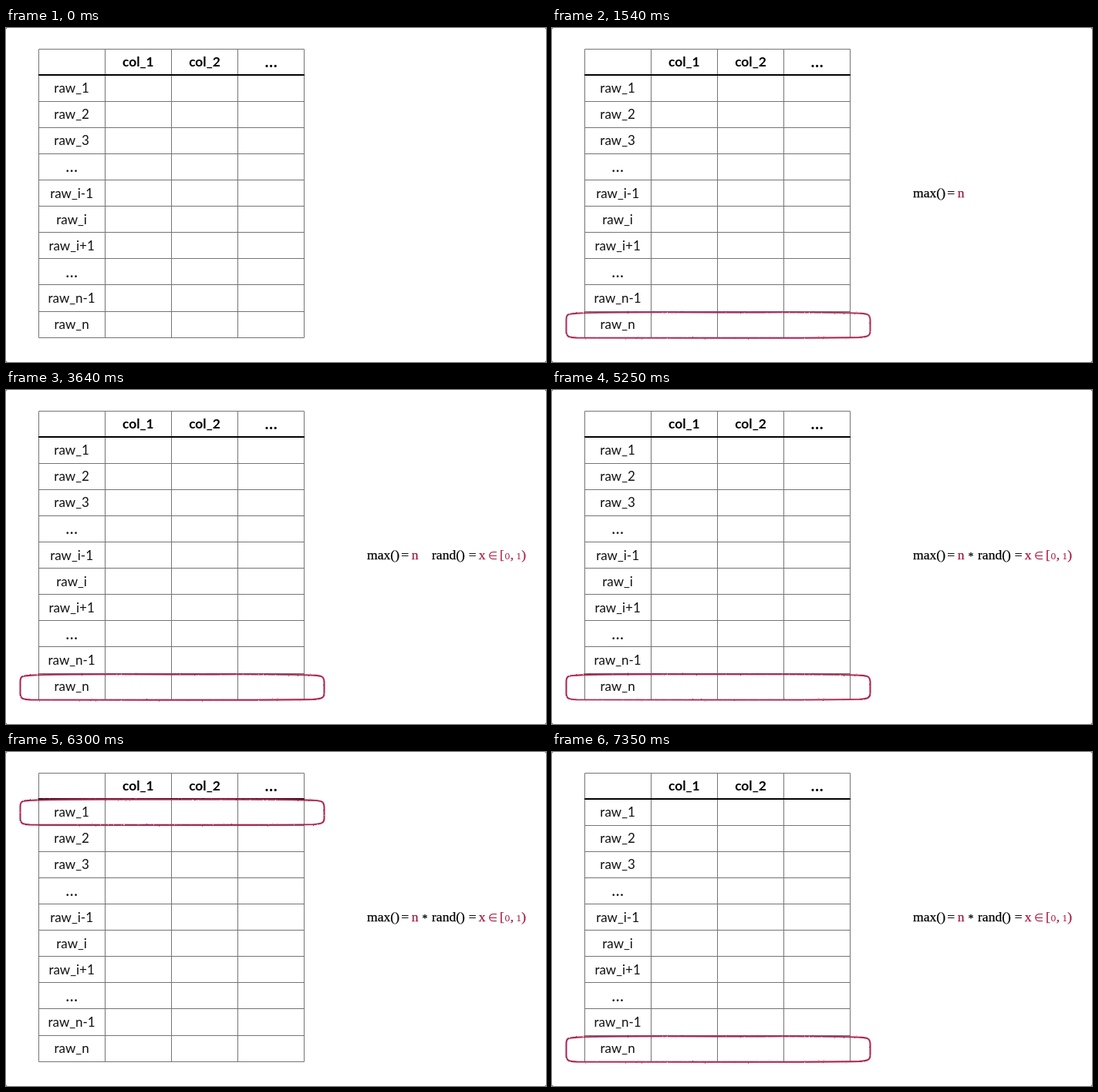
Write an HTML page that moves like this. It is 700x434 px and loops after 8000 ms.

```html
<!DOCTYPE html>
<html lang="en">
<head>
<meta charset="utf-8">
<title>Random row</title>
<style>
  html, body { margin: 0; width: 100%; height: 100%; overflow: hidden; background: #fff; }
  svg { display: block; width: 700px; height: 434px; }
  .table text { font: 17px Lato, "Open Sans", sans-serif; text-anchor: middle; fill: #111; }
  .table .head { font-size: 17.4px; font-weight: 700; fill: #000; }
  .table .dots { font-size: 21px; }
  .table path { fill: none; stroke: #747474; }
  .table .rule { stroke: #000; stroke-width: 2; }
  .formula { font: 17.6px "Liberation Serif", serif; fill: #000; stroke: #000; stroke-width: .25; }
  .red { fill: #a5183f; stroke: #a5183f; }
  .digit { font-family: "DejaVu Serif", serif; font-size: 11.5px; stroke: none; }
  .in { font-family: "DejaVu Sans", sans-serif; font-size: 14px; stroke: none; }
  #times { font-size: 14px; }
  .marker { fill: none; stroke: #a8224f; stroke-width: 1.9; filter: url(#chalk); }
</style>
</head>
<body>
<svg viewBox="0 0 700 434">
  <defs>
    <filter id="chalk" filterUnits="userSpaceOnUse" x="8" y="-28" width="416" height="58"
            color-interpolation-filters="sRGB">
      <feTurbulence type="fractalNoise" baseFrequency=".55" numOctaves="2" seed="4" result="noise"/>
      <feDisplacementMap in="SourceGraphic" in2="noise" scale="2" xChannelSelector="R" yChannelSelector="G" result="line"/>
      <feDropShadow in="line" dx="0" dy=".5" stdDeviation="1" flood-color="#80104a" flood-opacity=".18"/>
    </filter>
  </defs>
  <path d="M0 0h2Q0 0 0 2zM700 0v2Q700 0 698 0zM0 434v-2Q0 434 2 434zM700 434h-2Q700 434 700 432z" fill="#333"/>
  <g class="table" id="table"></g>
  <g class="formula">
    <text id="max" x="468" y="220">max()</text>
    <text id="eqN" x="512.2" y="220">= <tspan class="red" x="525.7">n</tspan></text>
    <text id="times" x="539.6" y="220.5">*</text>
    <text id="rand" x="552" y="220">rand()</text>
    <text id="eqX" x="599.7" y="220">= <tspan class="red" x="612.7">x</tspan>
      <tspan class="red in" x="625">∈</tspan>
      <tspan class="red" x="640">[</tspan><tspan class="red digit" x="646.3">0</tspan><tspan class="red" x="653.7">,</tspan>
      <tspan class="red digit" x="661.3">1</tspan><tspan class="red" x="668.3">)</tspan></text>
  </g>
  <g id="box">
    <path class="marker" d="M18.5 -7C18.5 -15 22 -14.5 32 -15.2C70 -17.3 120 -16.5 215 -16.5
      S370 -17.2 400 -15.2C409 -14.5 412 -14 412.5 -7L412.5 9C412 14 409 15.5 398 16
      C330 17 280 16.7 215 16.7S90 17 32 16.5C22 16 18.5 15 18.5 9Z"/>
  </g>
</svg>
<script>
const LOOP = 8000, TICK = 70;
const TOP = 78, BOTTOM = 386;
const $ = id => document.getElementById(id);

function buildTable() {
  const x0 = 42, y0 = 27, colW = 86.2, rowH = 34.1;
  const rows = ['1', '2', '3', null, 'i-1', 'i', 'i+1', null, 'n-1', 'n'];
  const heads = ['col_1', 'col_2', '…'];
  const lineX = i => Math.floor(x0 + i * colW) + .5;
  const lineY = i => Math.floor(y0 + i * rowH) + .5;
  const label = (s, col, row) => {
    const dots = s === '…';
    const cls = (row ? '' : 'head ') + (dots ? 'dots' : '');
    const x = x0 + (col + .5) * colW;
    const y = y0 + (row + .5) * rowH + (dots ? 7 : 6);
    return `<text class="${cls}" x="${x}" y="${y}">${s}</text>`;
  };
  let d = '';
  for (let i = 0; i <= 4; i++) d += `M${lineX(i)} ${lineY(0)}V${lineY(11)}`;
  for (let i = 0; i <= 11; i++) d += `M${lineX(0)} ${lineY(i)}H${lineX(4)}`;
  $('table').innerHTML = `<path d="${d}"/><path class="rule" d="M42 61H387"/>` +
    heads.map((s, i) => label(s, i + 1, 0)).join('') +
    rows.map((s, i) => label(s ? 'raw_' + s : '…', 0, i + 1)).join('');
}

// id, start, end
const fades = [
  ['max', 30, 510],
  ['eqN', 590, 1070],
  ['box', 1080, 1560],
  ['rand', 2680, 3120],
  ['eqX', 3180, 3660],
  ['times', 4790, 5270]
];

const part = (t, a, b) => Math.min(1, Math.max(0, (t - a) / (b - a)));
const ease = p => (1 - Math.cos(Math.PI * p)) / 2;

function draw(t) {
  for (const [id, a, b] of fades) $(id).setAttribute('opacity', part(t, a, b));
  const lift = ease(part(t, 5240, 6240)) - ease(part(t, 6290, 7290));
  $('box').setAttribute('transform', `translate(0 ${BOTTOM - (BOTTOM - TOP) * lift})`);
}

buildTable();
const start = performance.now();
function loop() {
  const t = (performance.now() - start) % LOOP;
  draw(Math.floor(t / TICK) * TICK);
  requestAnimationFrame(loop);
}
loop();
</script>
</body>
</html>
```
